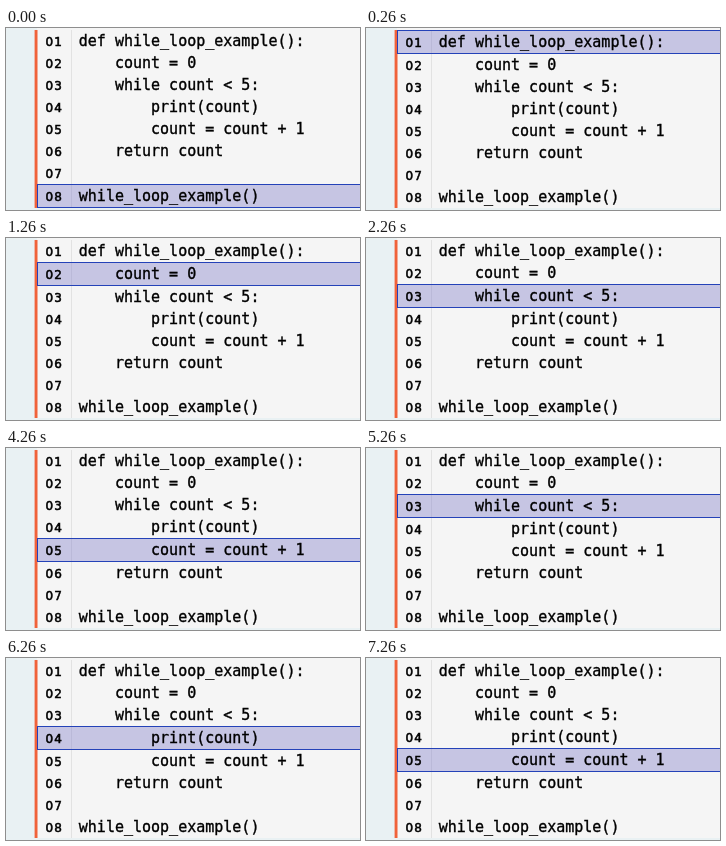
Write an HTML page with a canvas that moves like this. It is 354x182 px and loops after 8 s.

```html
<!DOCTYPE html>
<html lang="en">
<head>
<meta charset="utf-8">
<title>While loop trace</title>
<style>
  html, body { margin: 0; width: 100%; height: 100%; overflow: hidden; background: #e9f1f3; }
  canvas { display: block; }
</style>
</head>
<body>
<canvas id="stage" width="354" height="182"></canvas>
<script>
const ctx = document.getElementById('stage').getContext('2d');
const code = `def while_loop_example():
    count = 0
    while count < 5:
        print(count)
        count = count + 1
    return count

while_loop_example()`.split('\n');

const LOOP = 8000, STEP = 1000, FIRST = 260, PITCH = 22;
const trace = [8, 1, 2, 3, 4, 5, 3, 4, 5];

function rect(color, x, y, w, h) {
  ctx.fillStyle = color;
  ctx.fillRect(x, y, w, h);
}

// A thin outline gives the text its medium weight.
function text(str, x, y, font, spacing, weight) {
  ctx.font = font;
  ctx.letterSpacing = spacing;
  ctx.lineWidth = weight;
  ctx.fillStyle = ctx.strokeStyle = '#000';
  ctx.fillText(str, x, y);
  ctx.strokeText(str, x, y);
}

function draw(active) {
  rect('#e9f1f3', 0, 0, 354, 182);
  rect('#f5f5f5', 31, 0, 323, 180);
  rect('#f0623a', 28.6, 2, 2.9, 178);
  rect('#e2e2e2', 65, 2, 1, 178);

  const top = 2 + (active - 1) * PITCH;
  rect('#2442b8', 31, top, 323, 24);
  rect('#c6c5e3', 32, top + 1, 322, 22);
  rect('#bab9d8', 65, top + 1, 1, 22);

  // The highlighted row's two borders push the rows below it down.
  code.forEach((line, i) => {
    const shift = 1 + Math.sign(i + 1 - active);
    const y = 17.5 + i * PITCH + shift;
    text('0' + (i + 1), 39.5, y, '12px "DejaVu Sans", sans-serif', '1px', 0.55);
    text(line, 72.8, y, '15px "DejaVu Sans Mono", monospace', '0px', 0.35);
  });
}

function frame(now) {
  const t = now % LOOP;
  draw(trace[t < FIRST ? 0 : 1 + Math.floor((t - FIRST) / STEP)]);
  requestAnimationFrame(frame);
}
frame(0);
</script>
</body>
</html>
```
